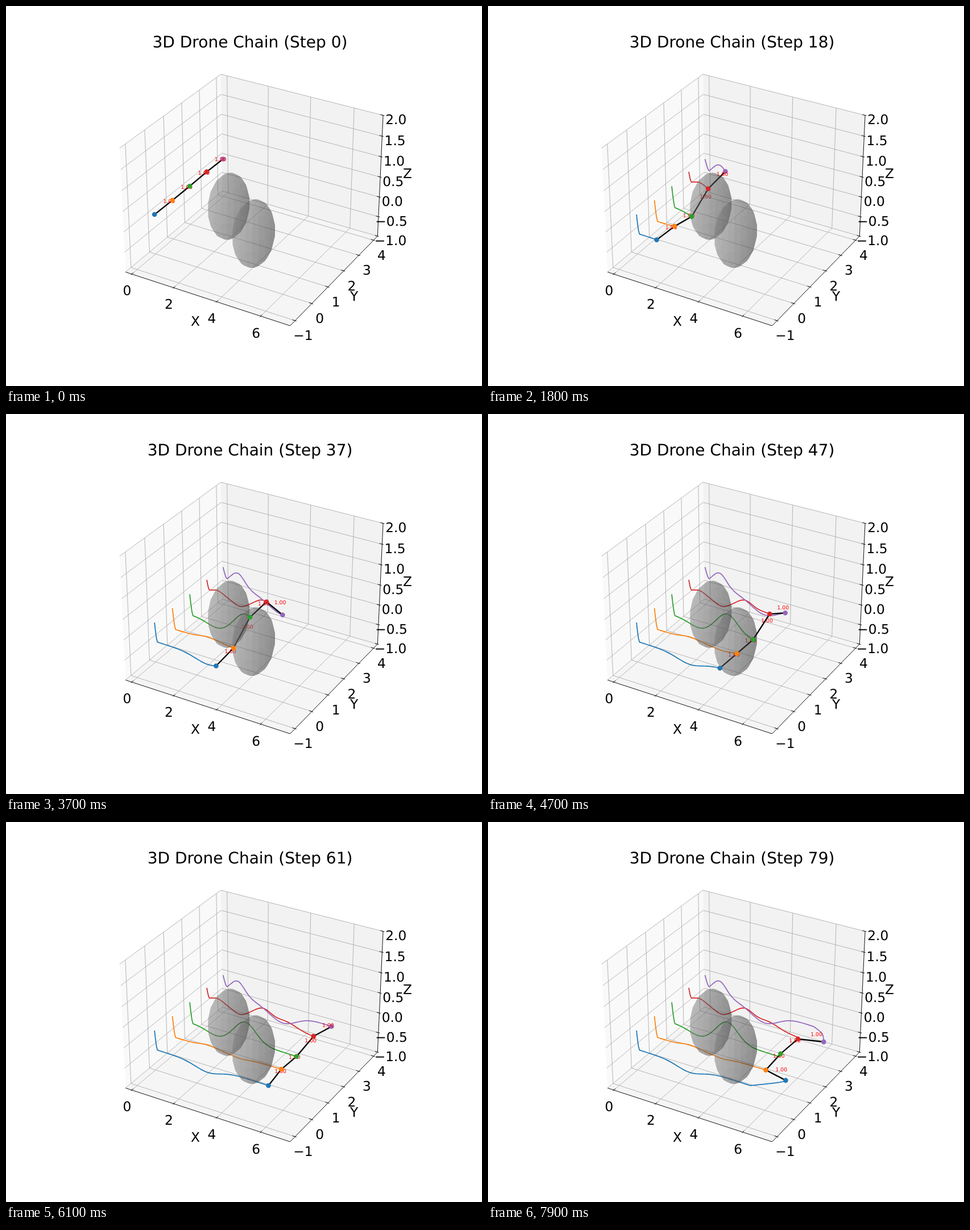
Write an HTML page that moves like this. It is 837 by 669 pixels and loops after 8 s.

```html
<!DOCTYPE html>
<html lang="en">
<head>
<meta charset="utf-8">
<title>3D Drone Chain</title>
<style>
  html, body { margin: 0; width: 100%; height: 100%; overflow: hidden; background: #fff; }
  svg { display: block; width: 837px; height: 669px; }
  text { font-family: "DejaVu Sans", sans-serif; font-size: 23.3px; text-anchor: middle; }
  .title { font-size: 28px; }
  .dist { font-size: 9.3px; fill: red; text-anchor: start; }
</style>
</head>
<body>
<svg id="stage" viewBox="0 0 837 669" text-rendering="geometricPrecision"></svg>
<script>
const STEP_MS = 100, STEPS = 80;
const svg = document.getElementById('stage');

function add(parent, tag, attrs, text) {
  const el = document.createElementNS('http://www.w3.org/2000/svg', tag);
  for (const k in attrs) el.setAttribute(k, attrs[k]);
  if (text !== undefined) el.textContent = text;
  parent.appendChild(el);
  return el;
}
const pathOf = pts => 'M' + pts.map(p => p[0].toFixed(2) + ' ' + p[1].toFixed(2)).join('L');
const range = (from, to, step = 1) =>
  Array.from({ length: Math.round((to - from) / step) + 1 }, (_, i) => from + i * step);

// Perspective camera: elevation 30 degrees, azimuth -60 degrees, distance 10
const lim = [[-0.3, 7.3], [-1.29, 4.275], [-1, 2]];
const size = [1.1905, 1.1905, 0.8929];
const [[x0, x1], [y0, y1], [z0, z1]] = lim;

function project(...p) {
  const [a, b, c] = p.map((v, i) => ((v - lim[i][0]) / (lim[i][1] - lim[i][0]) - 0.5) * size[i]);
  const depth = 10 - (0.433 * a - 0.75 * b + 0.5 * c);
  const k = 2784.5 / depth;
  return [435.9 + k * (0.866 * a + 0.5 * b), 330.9 - k * (-0.25 * a + 0.433 * b + 0.866 * c), depth];
}
const shape = pts => pathOf(pts.map(p => project(...p)));
const line = (pts, stroke) => add(svg, 'path', { d: shape(pts), fill: 'none', stroke, 'stroke-width': 0.93 });
const pane = (pts, fill) => add(svg, 'path', { d: shape(pts) + 'Z', fill });
const label = (str, x, y) => add(svg, 'text', { x, y: y + 8.5 }, str.replace('-', '\u2212'));

function drawAxes() {
  pane([[x0, y0, z0], [x0, y1, z0], [x0, y1, z1], [x0, y0, z1]], '#f9f9f9');
  pane([[x0, y1, z0], [x1, y1, z0], [x1, y1, z1], [x0, y1, z1]], '#f2f2f2');
  pane([[x0, y0, z0], [x1, y0, z0], [x1, y1, z0], [x0, y1, z0]], '#f5f5f5');

  const xs = range(0, 6, 2), ys = range(-1, 4), zs = range(-1, 2, 0.5);
  const grid = '#b0b0b0';
  xs.forEach(x => line([[x, y0, z0], [x, y1, z0], [x, y1, z1]], grid));
  ys.forEach(y => line([[x1, y, z0], [x0, y, z0], [x0, y, z1]], grid));
  zs.forEach(z => line([[x0, y0, z], [x0, y1, z], [x1, y1, z]], grid));
  line([[x0, y0, z0], [x1, y0, z0], [x1, y1, z0], [x1, y1, z1]], '#000');

  const dx = (x1 - x0) * 0.008, dy = (y1 - y0) * 0.008;
  const mark = ([x, y, z], tx, ty, str, ox, oy) => {
    line([[x + tx, y + ty, z], [x - 2 * tx, y - 2 * ty, z]], '#000');
    const [px, py] = project(x, y, z);
    label(str, px + ox, py + oy);
  };
  xs.forEach(x => mark([x, y0, z0], 0, -dy, String(x), -8.2, 29));
  ys.forEach(y => mark([x1, y, z0], dx, 0, String(y), 14, 26));
  zs.forEach(z => mark([x1, y1, z], dx, 0, z.toFixed(1), 22.7, 7.5));
  label('X', 333, 554);
  label('Y', 612, 510.5);
  label('Z', 706, 294);
}

// Translucent shaded sphere built from facets, far ones first
function drawSphere(parent, cx, cy, cz, r) {
  const nu = 19, nv = 9, facets = [];
  const dir = (i, j) => {
    const u = i / nu * 2 * Math.PI, v = j / nv * Math.PI;
    return [Math.cos(u) * Math.sin(v), Math.sin(u) * Math.sin(v), Math.cos(v)];
  };
  for (let i = 0; i < nu; i++) for (let j = 0; j < nv; j++) {
    const pts = [[i, j], [i + 1, j], [i + 1, j + 1], [i, j + 1]].map(([a, b]) => {
      const n = dir(a, b);
      return project(cx + r * n[0], cy + r * n[1], cz + r * n[2]);
    });
    const n = dir(i + 0.5, j + 0.5);
    const light = (-2 * n[0] - 2 * n[1] + n[2]) / 3;
    const g = Math.round(128 * (0.65 + 0.35 * light));
    facets.push({ pts, g, depth: pts.reduce((s, p) => s + p[2], 0) });
  }
  facets.sort((a, b) => b.depth - a.depth);
  for (const f of facets) {
    add(parent, 'path', { d: pathOf(f.pts) + 'Z', fill: `rgb(${f.g},${f.g},${f.g})`, 'fill-opacity': 0.3 });
  }
}

// Each drone sinks from start to low, then glides along a slope until stop.
// Bumps [x, width, height] are the swerves around the spheres; settle is the late rise or fall.
const drones = [
  { color: '#1f77b4', start: [261, 367], low: [264.5, 401], speed: 3.85, slope: 0.32, stop: 528, settle: -29,
    bumps: [[355, 22, 11]] },
  { color: '#ff7f0e', start: [292.5, 342], low: [296.5, 379], speed: 3.8, slope: 0.3, stop: 489, settle: 0,
    bumps: [[355, 14, -4], [412, 14, 3]] },
  { color: '#2ca02c', start: [323, 317], low: [327, 354], speed: 3.75, slope: 0.32, stop: 515, settle: -6,
    bumps: [[372, 18, 9], [421, 18, -32]] },
  { color: '#d62728', start: [353, 292.5], low: [356, 311], speed: 3.75, slope: 0.36, stop: 545.5, settle: 3,
    bumps: [[372, 9, -6], [410, 11, 8], [452, 14, -17], [492, 18, -9]] },
  { color: '#9467bd', start: [381.5, 272], low: [387, 297], speed: 3.65, slope: 0.34, stop: 591, settle: 21,
    bumps: [[407, 12, -24], [486, 24, 23]] }
];
const softMax = (a, b, k) => (a + b + Math.hypot(a - b, k)) / 2;
const softMin = (a, b, k) => -softMax(-a, -b, k);

function positionAt(d, s) {
  const sink = Math.min(1, s / 9);
  const [sx, sy] = d.start, [lx, ly] = d.low;
  const baseX = sx + (lx - sx) * sink;
  const x = softMin(baseX + d.speed * softMax(0, s - 9.7, 1.6), d.stop, 12);
  let y = sy + (ly - sy) * sink + d.slope * Math.max(0, x - baseX);
  for (const [cx, w, h] of d.bumps) y += h * Math.exp(-(((x - cx) / w) ** 2) / 2);
  return [x, y + d.settle * Math.max(0, (s - 61) / 18)];
}

drawAxes();
const title = add(svg, 'text', { class: 'title', x: 429, y: 73.2 });
const [trails, links, farDot, labels, spheres, dots] = range(1, 6).map(() => add(svg, 'g', {}));

drones.forEach((d, i) => {
  d.path = range(0, STEPS - 1).map(s => positionAt(d, s));
  d.trail = add(trails, 'path', { fill: 'none', stroke: d.color, 'stroke-width': 1.74, 'stroke-linejoin': 'round' });
  d.dot = add(i === 4 ? farDot : dots, 'circle', { r: 4.3, fill: d.color });
  if (i < 4) {
    d.link = add(links, 'path', { fill: 'none', stroke: '#000', 'stroke-width': 2.3, 'stroke-linecap': 'square' });
    d.dist = add(labels, 'text', { class: 'dist' }, '1.00');
  }
});
drawSphere(spheres, 2.3, 1.51, 0, 0.78);
drawSphere(spheres, 4.26, 0.52, 0, 0.78);

function render(step) {
  title.textContent = `3D Drone Chain (Step ${step})`;
  drones.forEach((d, i) => {
    const p = d.path[step];
    d.trail.setAttribute('d', pathOf(d.path.slice(0, step + 1)));
    d.dot.setAttribute('cx', p[0]);
    d.dot.setAttribute('cy', p[1]);
    if (!d.link) return;
    const q = drones[i + 1].path[step];
    d.link.setAttribute('d', pathOf([p, q]));
    d.dist.setAttribute('x', (p[0] + q[0]) / 2 - 0.5);
    d.dist.setAttribute('y', (p[1] + q[1]) / 2 - 7.2);
  });
}

const begin = performance.now();
let shown = -1;
function tick() {
  const step = Math.floor((performance.now() - begin) / STEP_MS) % STEPS;
  if (step !== shown) render(shown = step);
  requestAnimationFrame(tick);
}
tick();
</script>
</body>
</html>
```
